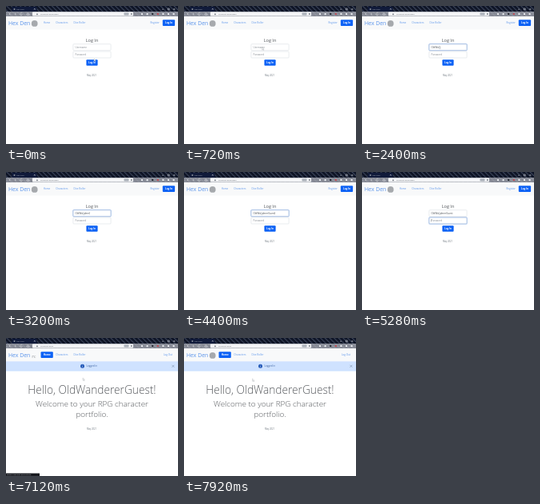
Animation, 215 px wide and 173 px high, one loop 8 s. Source, as an HTML page:

```html
<!DOCTYPE html>
<html lang="en">
<head>
<meta charset="utf-8">
<title>Log In</title>
<style>
  html, body { margin: 0; width: 100%; height: 100%; overflow: hidden; background: #fff; }
  svg { display: block; width: 100vw; height: 100vh; }
  text { font-family: "Open Sans", "Noto Sans", sans-serif; font-size: 3px; fill: #4b4f54; white-space: pre; }
  .link { fill: #5a94ea; }
  .white { fill: #fff; font-weight: 700; }
  .mid { text-anchor: middle; }
  .hint { fill: #868c93; }
  .blue { fill: #0d62f5; }
  .foot { font-size: 2.7px; fill: #6c757d; }
  .light { font-weight: 300; fill: #55585c; }
  .field { fill: #fff; stroke: #d3d8dd; stroke-width: .5; }
  .focus { stroke: #8ba9d6; stroke-width: .7; }
</style>
</head>
<body>
<svg viewBox="0 0 215 173" preserveAspectRatio="none">
  <defs>
    <pattern id="weave" width="4" height="4" patternUnits="userSpaceOnUse" patternTransform="rotate(-45)">
      <rect width="4" height="4" fill="#0d1324"/>
      <rect width="1.2" height="4" fill="#3a4359"/>
    </pattern>
  </defs>
  <rect width="215" height="173" fill="#fff"/>

  <!-- browser window -->
  <rect width="215" height="13" fill="url(#weave)"/>
  <rect x="7.5" y="1" width="31" height="6" fill="#101a3a"/>
  <circle cx="10.5" cy="4" r="1" fill="#8a919c"/>
  <text x="13" y="4.9" style="font-size:2.5px;fill:#aab1bd">Hex Den</text>
  <path d="M35 3l1.6 1.6m0-1.6l-1.6 1.6M195 4.2h2M209.3 3l2 2m0-2l-2 2" stroke="#d5d9df" stroke-width=".5"/>
  <rect x="202.2" y="3" width="2" height="2" fill="none" stroke="#d5d9df" stroke-width=".5"/>
  <rect y="7" width="215" height="6" fill="#b4b8c0" opacity=".72"/>
  <rect x="33" y="7.6" width="126" height="4.8" rx=".7" fill="#f4f5f7"/>
  <path d="M5.4 8.8L4 10l1.4 1.2M11 8.8l1.4 1.2-1.4 1.2M19.8 9a1.3 1.3 0 1 0 .5 1.2M26 10l1.5-1.2L29 10v1.3h-3z" fill="none" stroke="#f0f2f5" stroke-width=".5"/>
  <rect x="38" y="9.6" width="1.8" height="1.5" fill="#777d85"/>
  <text id="url" x="43" y="11" style="font-size:2.4px;fill:#555b64"></text>
  <rect x="147.5" y="8.5" width="6" height="3" rx=".8" fill="#a9afb8"/>
  <circle cx="156.8" cy="10" r="1" fill="#777d85"/>
  <g id="tools"></g>

  <!-- navigation -->
  <rect y="13" width="215" height="16.5" fill="#f8f9fa"/>
  <text class="link" x="3" y="24" style="font-size:6.9px">Hex Den</text>
  <circle id="mark" cx="35.7" cy="21.9" r="3.9" fill="#a6a9ad"/>
  <text id="alt" x="32.3" y="25" style="font-size:6px;fill:#8d9196">n:</text>
  <rect id="home" class="blue" x="43.5" y="17.2" width="15.3" height="7.8" rx="1"/>
  <text id="homeText" x="46.8" y="22.2">Home</text>
  <text class="link" x="62.3" y="22.2">Characters</text>
  <text class="link" x="84.5" y="22.2">Dice Roller</text>

  <g id="login">
    <text class="link" x="180.5" y="22.2">Register</text>
    <rect class="blue" x="195.8" y="17.2" width="15.3" height="7.8" rx="1"/>
    <text class="white mid" x="203.5" y="22.2">Log In</text>
    <text class="mid" x="107.5" y="45.3" style="font-size:5.5px">Log In</text>
    <rect id="ring1" x="83" y="46.8" width="49" height="9.8" rx="1.5" fill="#dfeafc"/>
    <rect id="ring2" x="83" y="56.1" width="49" height="9.8" rx="1.5" fill="#dfeafc"/>
    <rect id="box1" x="83.9" y="47.7" width="47.2" height="8" rx="1"/>
    <rect id="box2" x="83.9" y="57" width="47.2" height="8" rx="1"/>
    <text id="user" x="86.5" y="52.8"></text>
    <text id="pass" class="hint" x="86.5" y="62.1">Password</text>
    <g id="dots"></g>
    <rect id="caret" width=".3" height="3.2" fill="#4b4f54"/>
    <rect class="blue" x="100.4" y="67.2" width="14.2" height="7.6" rx="1"/>
    <text class="white mid" x="107.5" y="72.1">Log In</text>
    <text class="foot mid" x="107" y="88">May 2021</text>
  </g>

  <g id="welcome">
    <text class="link" x="197" y="22.2">Log Out</text>
    <rect y="29.3" width="215" height="12" fill="#cfe2ff"/>
    <path d="M0 41.2h215" stroke="#b6d4fe" stroke-width=".4"/>
    <circle cx="95.5" cy="35.3" r="2.5" fill="#2459b8"/>
    <path d="M95.5 34.8v1.8M95.5 33.5v.6" stroke="#cfe2ff" stroke-width=".5"/>
    <text x="100.5" y="36.4" style="fill:#3f64a0">Logged in</text>
    <path d="M207.4 33.8l3 3m0-3l-3 3" stroke="#6d7f9b" stroke-width=".5"/>
    <text class="light mid" x="107.5" y="70" style="font-size:13.7px">Hello, OldWandererGuest!</text>
    <text class="light mid" x="107.5" y="86.3" style="font-size:9.9px">Welcome to your RPG character</text>
    <text class="light mid" x="107.5" y="98.5" style="font-size:9.9px">portfolio.</text>
    <text class="foot mid" x="107" y="114.8">May 2021</text>
  </g>

  <g id="status">
    <rect y="169.6" width="42" height="3.4" fill="#17191f"/>
    <text x="1" y="172.2" style="font-size:2.5px;fill:#d6d9de">Read localhost:5000/static</text>
  </g>
  <path id="mouse" d="M0 0v3.2l.8-.7.6 1.3.6-.3-.6-1.2h1z" fill="#fff" stroke="#8a8f96" stroke-width=".3"/>
</svg>
<script>
const LOOP = 8000, NAME = "OldWandererGuest";
const $ = id => document.getElementById(id);

// [time, value...] steps
const typing = [[1100, 0], [1600, 3], [3200, 10], [4400, 16]];
const mousePath = [[0, 110, 66], [160, 109, 65], [800, 96, 50], [7520, 96, 50], [7920, 85.5, 51]];
const dotTimes = [5600, 5760, 6000, 6160, 6400];
const FOCUS = 800, TAB = 4800, ENTER = 6800, ICON = 7280, IDLE = 7440;

function at(steps, t, k) {
  const i = steps.findIndex(s => s[0] > t);
  if (i === 0) return steps[0][k];
  if (i < 0) return steps[steps.length - 1][k];
  const a = steps[i - 1], b = steps[i];
  return a[k] + (b[k] - a[k]) * (t - a[0]) / (b[0] - a[0]);
}
function show(id, on) { $(id).style.display = on ? "" : "none"; }
function add(parent, tag, attrs) {
  const el = document.createElementNS("http://www.w3.org/2000/svg", tag);
  for (const k in attrs) el.setAttribute(k, attrs[k]);
  return $(parent).appendChild(el);
}

["#eef0f3", "#eef0f3", "#22262d", "#c74750", "#eef0f3", "#eef0f3", "#eef0f3"].forEach((fill, i) =>
  add("tools", "rect", { x: 169 + i * 6.6, y: 9, width: 2, height: 2, rx: .5, fill }));
const dots = dotTimes.map((_, i) =>
  add("dots", "circle", { cx: 87.5 + i * 2.4, cy: 61.2, r: .85, fill: "#212529" }));

function draw(t) {
  const inside = t >= ENTER, typed = Math.floor(at(typing, t, 1) + 1e-6);
  const first = t >= FOCUS && t < TAB, second = t >= TAB;
  const count = dotTimes.filter(d => t >= d).length;
  const loading = inside && t < ICON;

  show("login", !inside);
  show("welcome", inside);
  show("home", inside);
  show("mark", !loading);
  show("alt", loading);
  show("status", inside && t < IDLE);
  $("homeText").setAttribute("class", inside ? "white" : "link");
  $("url").textContent = inside ? "localhost:5000" : "localhost:5000/login";

  $("user").textContent = typed ? NAME.slice(0, typed) : "Username";
  $("user").setAttribute("class", typed ? "" : "hint");
  show("pass", !count);
  dots.forEach((d, i) => d.style.display = i < count ? "" : "none");
  show("ring1", first);
  show("ring2", second);
  $("box1").setAttribute("class", first ? "field focus" : "field");
  $("box2").setAttribute("class", second ? "field focus" : "field");

  const end = first && typed ? $("user").getComputedTextLength() : 0;
  $("caret").setAttribute("x", 86.5 + (first ? end : count * 2.4));
  $("caret").setAttribute("y", first ? 50 : 59.3);
  show("caret", (first || second) && t % 1000 < 500);
  $("mouse").setAttribute("transform", `translate(${at(mousePath, t, 1)} ${at(mousePath, t, 2)})`);
}

const start = performance.now();
function tick() {
  const t = (performance.now() - start) % LOOP;
  draw(Math.floor(t / 80) * 80);
  requestAnimationFrame(tick);
}
tick();
</script>
</body>
</html>
```
